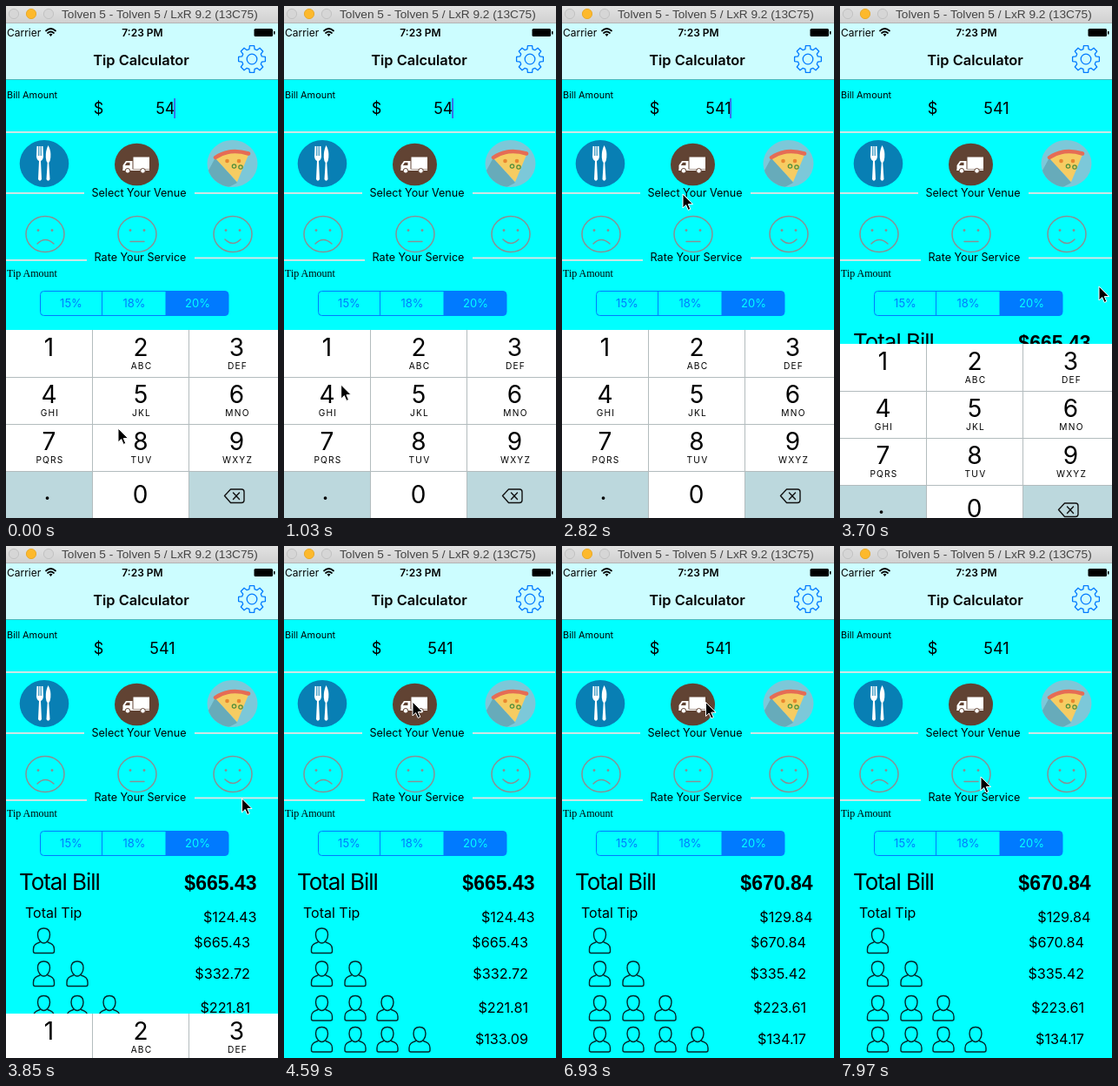
Write an HTML page that moves like this. It is 313 px wide and 588 px high and loops after 8000 ms.

```html
<!DOCTYPE html>
<html lang="en">
<head>
<meta charset="utf-8">
<title>Tip Calculator</title>
<style>
  html, body { margin: 0; width: 100%; height: 100%; overflow: hidden; background: #0ff; }
  svg { display: block; width: 100vw; height: 100vh; }
  text { font-family: Inter, Roboto, sans-serif; fill: #000; }
  .sans { font-family: "Liberation Sans", sans-serif; }
  .serif { font-family: "Liberation Serif", serif; }
  .big { letter-spacing: -0.04em; }
  .letters { letter-spacing: 1.2px; }
  .line { fill: none; stroke-linecap: round; stroke-linejoin: round; }
</style>
</head>
<body>
<svg id="stage" viewBox="0 0 313 588" preserveAspectRatio="none">
  <defs>
    <linearGradient id="chrome" x2="0" y2="1">
      <stop stop-color="#e2e2e2"/><stop offset="1" stop-color="#d0d0d0"/>
    </linearGradient>
    <clipPath id="plate"><ellipse cx="260.500" cy="181" rx="29" ry="27"/></clipPath>
    <g id="person" class="line" stroke="#04282c" stroke-width="1.4">
      <path d="M0 -14C-4.500 -14 -7 -11 -7 -6.500C-7 -2 -4 3 0 3S7 -2 7 -6.500C7 -11 4.500 -14 0 -14Z"/>
      <path d="M-4.500 2C-9 3.500 -12 5 -12 10V12.500Q-12 14.500 -10 14.500H10Q12 14.500 12 12.500V10C12 5 9 3.500 4.500 2"/>
    </g>
  </defs>
  <rect width="313" height="588" fill="#0ff"/>
  <g id="screen"></g>
  <g id="keypad"></g>
  <path id="pointer" d="M0 0V16L3.700 12.600L6.200 18.400L8.800 17.300L6.300 11.600H11.500Z"
        fill="#000" stroke="#fff" stroke-width="1" stroke-linejoin="round"/>
</svg>
<script>
const $ = id => document.getElementById(id);
const text = (x, y, size, str, attrs = '') =>
  `<text x="${x}" y="${y}" font-size="${size}" ${attrs}>${str}</text>`;
const rect = (x, y, w, h, fill, attrs = '') =>
  `<rect x="${x}" y="${y}" width="${w}" height="${h}" fill="${fill}" ${attrs}/>`;
const oval = (x, y, rx, ry, fill, attrs = '') =>
  `<ellipse cx="${x}" cy="${y}" rx="${rx}" ry="${ry}" fill="${fill}" ${attrs}/>`;
const path = (d, attrs) => `<path d="${d}" ${attrs}/>`;
const MID = 'text-anchor="middle"', END = 'text-anchor="end"';
const BLUE = '#007aff', KEY_GREY = '#bcd8dd', FACE_GREY = '#8a8f92';

function gear(cx, cy) {
  const points = [];
  for (let i = 0; i < 8; i++) {
    for (const [turn, r] of [[-.27, 11.8], [-.17, 15.6], [.17, 15.6], [.27, 11.8]]) {
      const a = i * Math.PI / 4 + turn;
      points.push((cx + r * Math.cos(a)).toFixed(1) + ',' + (cy + r * Math.sin(a)).toFixed(1));
    }
  }
  return `<g class="line" stroke="${BLUE}" stroke-width="1.3"><polygon points="${points.join(' ')}"/>
    <circle cx="${cx}" cy="${cy}" r="5.800"/></g>`;
}

function header() {
  const lamp = (x, fill, edge) => oval(x, 9, 5.6, 5.6, fill, `stroke="${edge}"`);
  return rect(0, 0, 313, 20, 'url(#chrome)') + rect(0, 19, 313, 1, '#b4b4b4')
    + lamp(9, '#d6d6d6', '#c2c2c2') + lamp(29, '#fdb92c', '#e8aa2c') + lamp(49, '#d6d6d6', '#c2c2c2')
    + text(64, 14, 13.7, 'Tolven 5 - Tolven 5 / LxR 9.2 (13C75)', 'class="sans" style="fill:#444"')
    + rect(0, 20, 313, 64, '#ccfdff') + rect(0, 84, 313, 1, '#48b9bd')
    + text(1, 34.5, 12, 'Carrier')
    + path('M46 28.500Q51.500 23.500 57 28.500M48 31Q51.500 28 55 31', 'class="line" stroke="#000" stroke-width="1.7"')
    + path('M49.500 32.500Q51.500 31 53.500 32.500L51.500 35Z', '')
    + text(157, 34.5, 12, '7:23 PM', MID + ' font-weight="600"')
    + rect(285.5, 26, 21.5, 9, '#000', 'rx="1.500"') + rect(308, 29, 1.5, 3.5, '#000')
    + text(155.5, 68, 16.4, 'Tip Calculator', MID + ' font-weight="600"') + gear(283, 61);
}

function venues() {
  const cutlery = oval(44, 181, 28.3, 27, '#087fb4')
    + path('M35.500 161L35 173Q35.500 177 38 178L37 199Q39 202.500 41 199L40 178Q42.500 177 43 173L42.500 161Z', 'fill="#fff"')
    + path('M37.800 160V172M40.200 160V172', 'stroke="#087fb4" stroke-width="1"')
    + path('M48.500 160Q52 166 51.300 174Q51 178 49.300 180L50.500 199Q48.500 202.500 46.500 199L47.700 180Q46 178 45.800 174Q45.500 166 48.500 160Z', 'fill="#fff"');
  const truck = oval(150.5, 182, 25.5, 24.3, '#614333')
    + rect(146.5, 173.5, 18.5, 13.5, '#fff')
    + path('M134.500 189V183L138 178H145.500V189Z', 'fill="#fff"')
    + path('M136.800 183L139 179.800H142.500V183Z', 'fill="#614333"') + rect(134.5, 187.5, 30.5, 1.5, '#fff')
    + [140, 157.5].map(x => oval(x, 189.3, 2.8, 2.8, '#fff', 'stroke="#614333"')).join('');
  const pizza = oval(260.5, 181, 29, 27, '#7cc8d9')
    + path('M241 174L228 198L245 214L266 203Z', 'fill="#67abba" clip-path="url(#plate)"')
    + path('M241 175Q257 163 279 171L266 202Z', 'fill="#f6cc62"')
    + path('M241 174Q257 163 279 169.500', 'class="line" stroke="#e56c55" stroke-width="4.500"')
    + [[254.5, 178], [268, 178]].map(p => oval(...p, 2.3, 2.3, '#e9872f')).join('')
    + [[262.5, 184], [270, 185]].map(p => oval(...p, 2.2, 2.2, 'none', 'stroke="#4f8d3a" stroke-width="1.200"')).join('');
  return cutlery + truck + pizza + text(153, 219, 12.6, 'Select Your Venue', MID);
}

function faces() {
  const face = (x, mouth) => oval(x, 262, 22, 20.5, 'none')
    + [-8, 8].map(dx => oval(x + dx, 257.5, 1.4, 1.5, FACE_GREY, 'stroke="none"')).join('') + path(mouth, '');
  return `<g class="line" stroke="${FACE_GREY}" stroke-width="1.500">`
    + face(45, 'M36 273Q45 264 55 273') + face(151, 'M143 270.500H159') + face(261, 'M252 268Q261 277 270 268')
    + '</g>' + text(154.5, 293, 12.6, 'Rate Your Service', MID);
}

function tipChoice() {
  return text(1, 311, 12, 'Tip Amount', 'class="serif"')
    + path('M183.500 327.500H252Q256 327.500 256 331.500V351.500Q256 355.500 252 355.500H183.500Z', `fill="${BLUE}"`)
    + rect(39.5, 327.5, 216.5, 28, 'none', `rx="4" stroke="${BLUE}"`) + rect(110, 328, 1, 27, BLUE)
    + [['15%', 75, BLUE], ['18%', 147.5, BLUE], ['20%', 220.5, '#0ff']]
      .map(([s, x, c]) => text(x, 346, 13, s, `${MID} style="fill:${c}"`)).join('');
}

const amounts = [[288.5, 395], [288.5, 432], [281, 461], [281, 497], [281, 536], [281, 572]];

function totals() {
  const columns = [43.5, 82, 119, 156];
  let out = text(15, 395, 26, 'Total Bill', 'class="big"') + text(22, 427, 16, 'Total Tip');
  [453, 491, 530.5, 566.5].forEach((y, row) => columns.slice(0, row + 1).forEach(x => {
    out += `<use href="#person" x="${x}" y="${y}"/>`;
  }));
  amounts.forEach(([x, y], i) => {
    out += text(x, y, i ? 16.2 : 23, '', `id="amount${i}" ${END} ${i ? '' : 'class="sans" font-weight="700"'}`);
  });
  return out;
}

function dividers() {
  return [[0, 144, 312], [0, 214, 90], [217, 214, 96], [0, 291, 93], [217, 288.5, 96]]
    .map(([x, y, w]) => rect(x, y, w, 1.8, '#e4e4e4')).join('');
}

function keypad() {
  const left = [0, 100, 211, 313], centers = [49.5, 155, 265.5];
  const letters = ['', 'ABC', 'DEF', 'GHI', 'JKL', 'MNO', 'PQRS', 'TUV', 'WXYZ'];
  let out = rect(0, 372, 313, 217, '#fff');
  for (let i = 0; i < 12; i++) {
    const col = i % 3, row = Math.floor(i / 3), y = 372 + row * 54, x = centers[col];
    const fill = i === 9 || i === 11 ? KEY_GREY : '#fff';
    out += rect(left[col], y, left[col + 1] - left[col], 54, fill, `id="key${i}"`);
    if (i < 9) {
      out += text(x, y + 30, 28, i + 1, MID)
        + text(x + 1, y + 45, 10.2, letters[i], MID + ' class="letters"');
    }
  }
  out += text(47.5, 567, 28, '.', MID) + text(154.5, 571, 28, '0', MID);
  for (const y of [426, 480, 534]) out += rect(0, y, 313, 1, '#b3bcbe');
  for (const x of [99, 210]) out += rect(x, 372, 1, 217, '#b3bcbe');
  return out + path('M251.500 562.500L258.500 555H271Q274 555 274 558V567.500Q274 570.500 271 570.500H258.500ZM261.500 559L268.500 566.500M268.500 559L261.500 566.500',
    'class="line" stroke="#111" stroke-width="1.400"');
}

$('screen').innerHTML = header() + dividers()
  + text(1, 106, 10.9, 'Bill Amount') + text(106.5, 124, 18, '$', MID)
  + text(194.5, 124, 18, '', `id="bill" ${END}`) + rect(193.2, 106, 1.8, 23, '#3f62e8', 'id="caret"')
  + venues() + faces() + tipChoice() + totals();
$('keypad').innerHTML = keypad();

// The screen refreshes in ticks; tracks hold [tick, ...values].
const LOOP = 8000, TICK = 147.55;
const pointerTrack = [
  [0, 129, 485], [2, 118, 503], [5, 76, 450], [8, 45, 405], [9, 45, 407], [10, 50, 400], [12, 167, 226],
  [14, 225, 192], [16, 247, 182], [18, 78, 224], [19, 139, 216], [21, 220, 272], [23, 290, 345],
  [24, 297, 357], [25, 298, 322], [27, 245, 258], [30, 156, 186], [31, 148, 179], [32, 148, 179],
  [36, 264, 172], [37, 262, 175], [41, 262, 175], [42, 256, 180], [43, 256, 180], [45, 195, 180],
  [47, 136, 179], [48, 136, 179], [50, 67, 245], [51, 90, 278], [52, 150, 281], [53, 195, 272], [54, 162, 265]
];
const keypadTrack = [[24, 0], [25, 16], [26, 165], [27, 210], [28, 216]];

function sample(track, tick) {
  const next = track.findIndex(key => key[0] >= tick);
  if (next <= 0) return track[next < 0 ? track.length - 1 : 0].slice(1);
  const a = track[next - 1], b = track[next], p = (tick - a[0]) / (b[0] - a[0]);
  return a.slice(1).map((v, i) => v + (b[i + 1] - v) * p);
}

// The small nudge keeps exact half cents rounding up.
const money = value => '$' + (value + 1e-6).toFixed(2);

function showAmounts(bill, rate) {
  const total = bill * (1 + rate);
  [total, bill * rate, total, total / 2, total / 3, total / 5].forEach((value, i) => {
    $('amount' + i).textContent = money(value);
  });
}

const within = (tick, from, to) => tick >= from && tick < to;

function draw(tick) {
  const [x, y] = sample(pointerTrack, tick);
  $('pointer').setAttribute('transform', `translate(${x} ${y})`);
  $('keypad').setAttribute('transform', `translate(0 ${sample(keypadTrack, tick)[0]})`);
  $('key0').setAttribute('fill', tick === 9 ? KEY_GREY : '#fff');
  $('bill').textContent = tick < 10 ? '54' : '541';
  const blink = within(tick, 4, 6) || within(tick, 14, 16) || within(tick, 21, 23);
  $('caret').setAttribute('opacity', tick >= 25 || blink ? 0 : 1);
  showAmounts(541, tick < 43 ? .23 : .24);
}

let shown = -1;
const start = performance.now();
function frame(now) {
  const tick = Math.floor(Math.max(0, now - start) % LOOP / TICK);
  if (tick !== shown) draw(shown = tick);
  requestAnimationFrame(frame);
}
draw(0);
requestAnimationFrame(frame);
</script>
</body>
</html>
```
